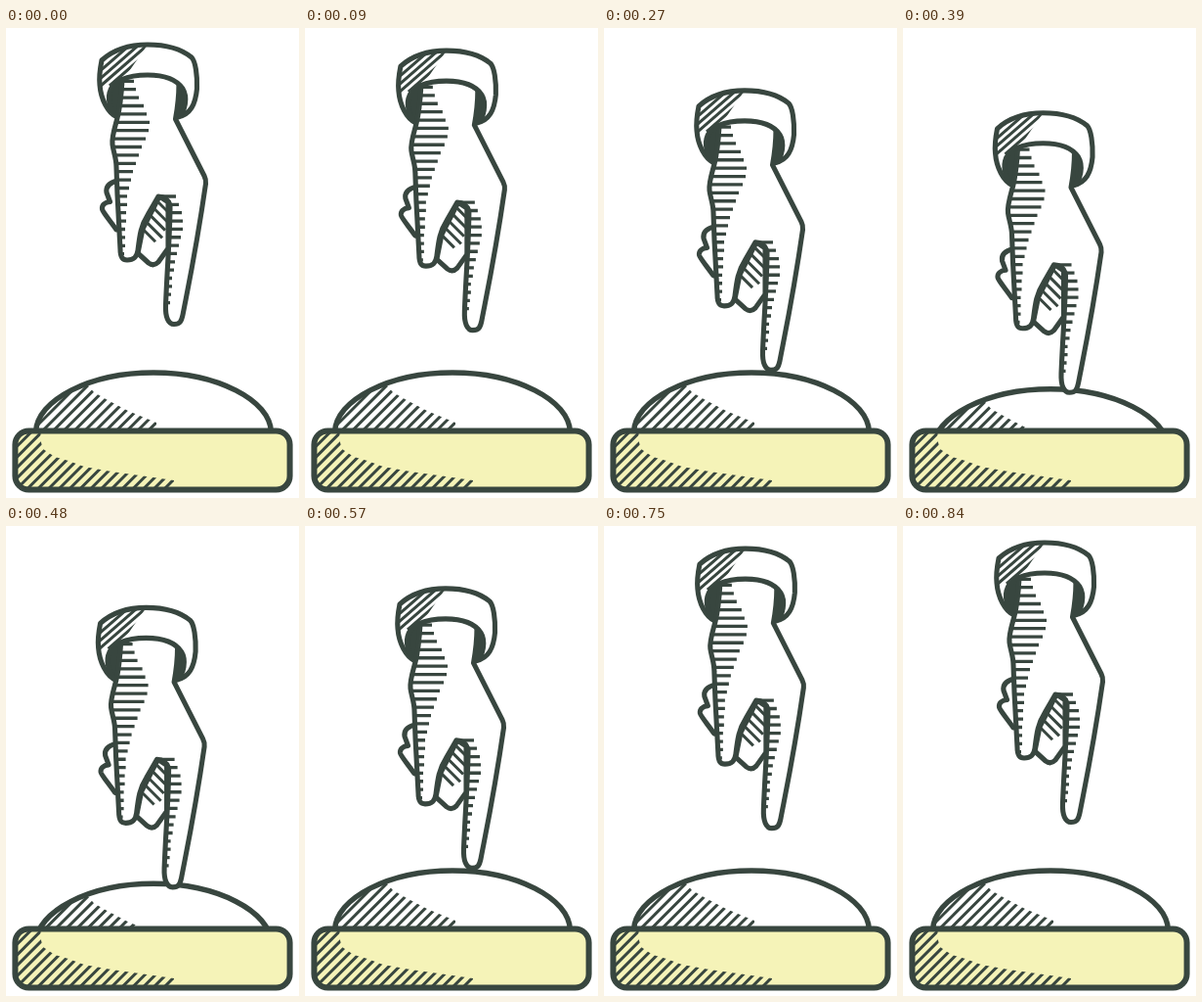
These frames come from a looping animation (300 px wide and 480 px high, 870 ms). An HTML page with a canvas:

```html
<!DOCTYPE html>
<html lang="en">
<head>
<meta charset="utf-8">
<title>Press the button</title>
<style>
html, body { margin: 0; width: 100%; height: 100%; overflow: hidden; background: #fff; }
canvas { display: block; width: 300px; height: 480px; }
</style>
</head>
<body>
<canvas id="stage"></canvas>
<script>
const INK = '#38463f', PAPER = '#fff', YELLOW = '#f5f3b8';
const OUTLINE = 5.1, HATCH = 3;
const LOOP = 870, STEP = 30, HALF = 420;
const TRAVEL = 71, CONTACT = 53;

const canvas = document.getElementById('stage');
const ctx = canvas.getContext('2d');
const ratio = window.devicePixelRatio || 1;
canvas.width = 300 * ratio;
canvas.height = 480 * ratio;

const dome = new Path2D('M30.5 413C31 380 86 352 151 352S271 380 271.5 413Z');
const domeShade = new Path2D('M28 350H84V365L90 372L104 380L125 391L154 403V412H28Z');
const base = new Path2D();
base.roundRect(9.4, 411.4, 281.2, 60, 14);
const baseShade = new Path2D(
  'M9 411H36L35 420L38 430L50 438L64 442L80 448L108 453L144 458L172 462V472H9Z');

const cuff = new Path2D(
  'M98 33C110 22 127 17 145 17C164 17 179 21 190 30C194 34 196 48 195.5 62' +
  'C194 78 189 88 176 91L114 91C104 87 97 72 96 58C95 48 97 38 98 33Z');
const cuffShade = new Path2D('M90 10H150L131 37L118 56V95H90Z');
const rimCurve =
  'M114 91C108 88 104 74 106 66C109 54 124 48 145 48C162 48 175 53 181 62C186 70 184 86 176 91';
const rim = new Path2D(rimCurve);
const knuckles = new Path2D(
  'M114 156C106 158 102 162 103 168L106.5 177.5C101 178 98 181 98.5 185C99 188 106 196 113 206H125V156Z');
const foldedFinger = new Path2D(
  'M157 172L140 205L135 230L146 240Q151 244 156 239L166 225V178Z');

// The wrist top stays open: its outline is covered by the cuff rim.
const handEdge =
  'M119 53C118 70 117 80 114 92C111 103 108 112 109 119C110 127 113 133 113 142' +
  'L114 170L117 226C117 234 119 237 124 237C131 237 134 234 135 227' +
  'C137 211 138 202 145 191L156 172Q165 172 168 181' +
  'C168 210 165 245 163.5 283C163 295 166 302.5 172 302.5C178 302.5 179.5 300 181 293' +
  'C187 262 195 225 204.5 159Q205 155 203 151L173.5 93Q177 74 177 57';
const handOutline = new Path2D(handEdge);
const handFill = new Path2D(handEdge + 'Q146 42 119 53Z');

// Right ends of the horizontal shading rows.
const palmEnds = [131, 133, 136, 141, 144, 147, 146, 143, 139, 136, 133,
  130, 128, 126, 124, 124, 123, 123, 122, 122, 122, 121];
const fingerEnds = [174, 177, 180, 181, 181, 179, 177, 175, 173, 172, 170, 170, 169, 168];

function line(x1, y1, x2, y2) {
  ctx.beginPath();
  ctx.moveTo(x1, y1);
  ctx.lineTo(x2, y2);
  ctx.stroke();
}

function shape(path, fill, width = OUTLINE) {
  ctx.fillStyle = fill;
  ctx.fill(path);
  ctx.lineWidth = width;
  ctx.stroke(path);
}

// Parallel strokes rising to the right, trimmed to the given areas.
function hatch(clips, count, firstX, gap, bottom, slope) {
  ctx.save();
  clips.forEach(path => ctx.clip(path));
  ctx.lineWidth = HATCH;
  for (let i = 0; i < count; i++) {
    const x = firstX + i * gap;
    line(x, bottom, x + 100, bottom - 100 * slope);
  }
  ctx.restore();
}

function drawDome(offset) {
  ctx.save();
  ctx.translate(0, offset);
  shape(dome, PAPER, 5.5);
  hatch([dome, domeShade], 12, 26, 10.8, 412, 1);
  ctx.restore();
}

function drawBase() {
  shape(base, YELLOW, 6);
  hatch([base, baseShade], 19, -33, 10.8, 471.5, 1);
}

function drawHand(offset) {
  ctx.save();
  ctx.translate(-1.5 * offset / TRAVEL, offset);
  shape(knuckles, PAPER);
  shape(foldedFinger, PAPER);

  ctx.save();
  ctx.clip(foldedFinger);
  ctx.lineWidth = HATCH;
  for (let i = 0; i < 5; i++) {
    const x = 156 - i * 4, y = 178 + i * 6.8;
    const length = 13 + (i % 4);
    line(x, y, x + length, y + length);
  }
  ctx.restore();

  shape(cuff, PAPER);
  hatch([cuff, cuffShade], 6, 79, 9, 59, 0.87);
  ctx.fillStyle = INK;
  ctx.fill(rim);

  ctx.fillStyle = PAPER;
  ctx.fill(handFill);
  ctx.save();
  ctx.clip(handFill);
  ctx.lineWidth = 3.3;
  palmEnds.forEach((x, i) => line(105, 54.3 + i * 8.4, x, 54.3 + i * 8.4));
  fingerEnds.forEach((x, i) => line(i ? 162 : 157, 172 + i * 8.35, x, 172 + i * 8.35));
  ctx.restore();
  ctx.lineWidth = OUTLINE;
  ctx.stroke(handOutline);
  ctx.stroke(rim);
  ctx.restore();
}

// Cubic easing with handles (.42, 0) and (.69, 1), solved by bisection.
function ease(x) {
  let low = 0, high = 1;
  for (let i = 0; i < 24; i++) {
    const u = (low + high) / 2, v = 1 - u;
    const at = 1.26 * u * v * v + 2.07 * u * u * v + u * u * u;
    if (at < x) low = u; else high = u;
  }
  return low * low * (3 - 2 * low);
}

function draw(now) {
  const time = Math.floor((now % LOOP) / STEP) * STEP;
  const offset = TRAVEL * ease(1 - Math.abs(time - HALF) / HALF);
  ctx.setTransform(ratio, 0, 0, ratio, 0, 0);
  ctx.fillStyle = PAPER;
  ctx.fillRect(0, 0, 300, 480);
  ctx.strokeStyle = INK;
  ctx.lineJoin = 'round';
  ctx.lineCap = 'butt';
  drawDome(Math.max(0, offset - CONTACT));
  drawBase();
  drawHand(offset);
}

let start;
function tick(now) {
  start ??= now;
  draw(Math.max(0, now - start));
  requestAnimationFrame(tick);
}
draw(0);
requestAnimationFrame(tick);
</script>
</body>
</html>
```
